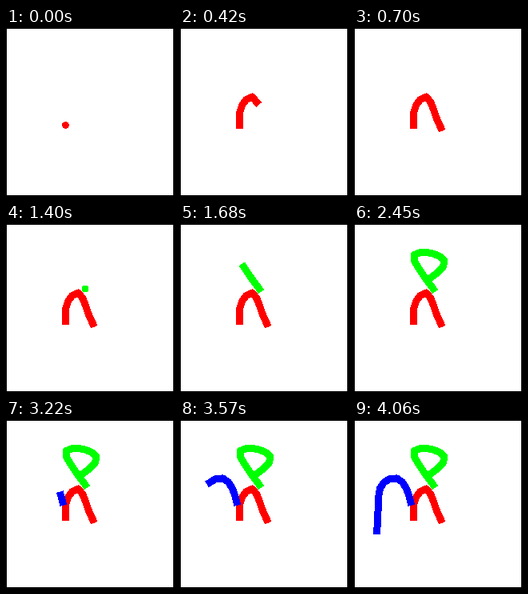
Animation, 210 px wide and 210 px high, one loop 4760 ms. Source, as an HTML page:

```html
<!DOCTYPE html>
<html lang="en">
<head>
<meta charset="utf-8">
<title>Three strokes</title>
<style>
  html, body { margin: 0; height: 100%; overflow: hidden; background: #fff; }
  svg { display: block; width: 100%; height: 100%; }
  path { fill: none; stroke-width: 9; stroke-linejoin: round; }
</style>
</head>
<body>
<svg viewBox="0 0 210 210" shape-rendering="crispEdges">
  <rect x=".5" y=".5" width="209" height="209" fill="#fff" stroke="#000"/>
</svg>
<script>
const TICK = 70, LOOP = 68;
const svg = document.querySelector('svg');

// Each stroke follows its curve in equal steps, one per tick from its start.
const strokes = [
  { color: '#f00', start: 0, steps: 10,
    curve: 'M74.5 121.5 C72.5 103 78 90 89 85.5 C98 88 100 110 108.5 124.5' },
  { color: '#0f0', start: 20, steps: 15,
    curve: 'M99 81 C91 70 81 57 75.5 46 C71 36 80 35 91.5 35.5 ' +
           'C101 37 112 41 113.5 47 C114 54 103 63 92 69.5' },
  { color: '#00f', start: 45, steps: 13,
    curve: 'M70.8 102.5 C67 86 61 73 51 72.5 C42 72 31 80 31 94 L28.8 138.5' }
];

function makePath(d) {
  const path = document.createElementNS(svg.namespaceURI, 'path');
  path.setAttribute('d', d);
  return path;
}

function sample(curve, steps) {
  const path = makePath(curve), length = path.getTotalLength();
  return Array.from({ length: steps + 1 }, (_, i) => {
    const { x, y } = path.getPointAtLength(length * i / steps);
    return [x, y];
  });
}

for (const s of strokes) {
  s.points = sample(s.curve, s.steps);
  s.path = makePath('');
  s.path.setAttribute('stroke', s.color);
  svg.append(s.path);
}

function draw(tick) {
  for (const { path, start, points } of strokes) {
    const shown = points.slice(0, Math.max(0, tick - start + 1));
    // A lone point is a round dot; a line has square ends.
    if (shown.length === 1) shown.push(shown[0]);
    path.setAttribute('stroke-linecap', tick === start ? 'round' : 'square');
    path.setAttribute('d', shown.length ? 'M' + shown.join('L') : '');
  }
}

const origin = performance.now();
function frame() {
  draw(Math.floor((performance.now() - origin) / TICK) % LOOP);
  requestAnimationFrame(frame);
}
frame();
</script>
</body>
</html>
```
